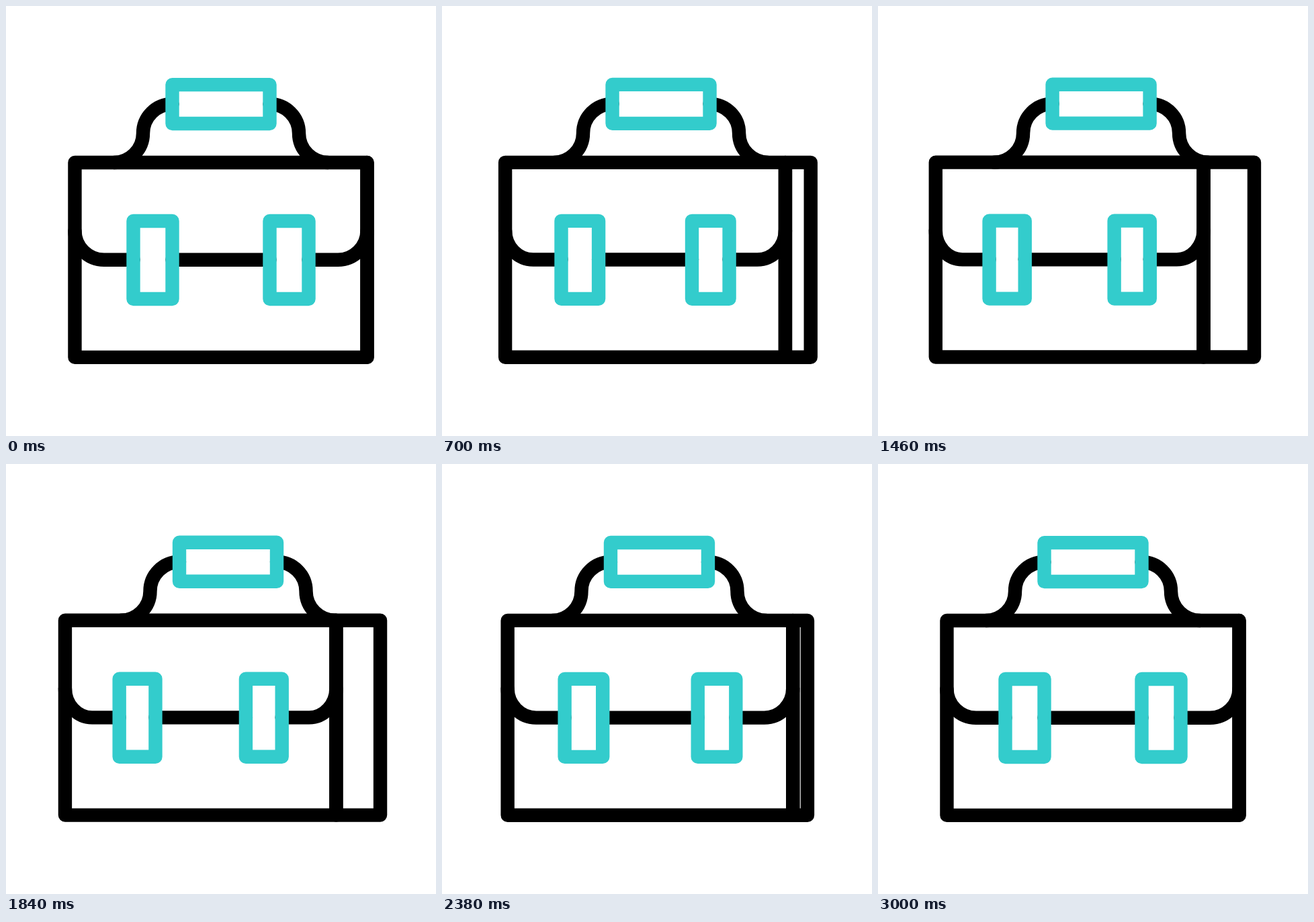
Animation, 640 px wide and 640 px high, one loop 3.6 s. Source, as an HTML page with a canvas:

```html
<!DOCTYPE html>
<html lang="en">
<head>
<meta charset="utf-8">
<title>Briefcase</title>
<style>
  html, body { margin: 0; width: 100%; height: 100%; overflow: hidden; background: #fff; }
  canvas { display: block; width: 640px; height: 640px; }
</style>
</head>
<body>
<canvas id="stage" width="640" height="640"></canvas>
<script>
const ctx = document.getElementById('stage').getContext('2d');
const LOOP = 3600, OPEN = 1400, CLOSED = 3000, STEP = 20;
const BLACK = '#000', TEAL = '#33cccc';
const LEFT = 102.45, RIGHT = 537.5, TOP = 233, BOTTOM = 522.9, R = 43.5;

// cubic-bezier(.5, 0, .5, 1)
function ease(u) {
  if (u <= 0) return 0;
  if (u >= 1) return 1;
  let lo = 0, hi = 1;
  for (let i = 0; i < 30; i++) {
    const s = (lo + hi) / 2;
    if (1.5 * s * (1 - s) + s * s * s < u) lo = s; else hi = s;
  }
  return lo * lo * (3 - 2 * lo);
}

function turn(t) {
  return t < OPEN ? ease(t / OPEN) : 1 - ease((t - OPEN) / (CLOSED - OPEN));
}

function stroke(color, path) {
  ctx.strokeStyle = color;
  ctx.beginPath();
  path();
  ctx.stroke();
}

function box(color, x1, y1, x2, y2) {
  stroke(color, () => ctx.rect(x1, y1, x2 - x1, y2 - y1));
}

function drawHandle(dx) {
  for (const side of [-1, 1]) {
    const x = 320 + dx + side * 72.5;
    const inner = side < 0;
    stroke(BLACK, () => {
      ctx.moveTo(x, 146);
      ctx.arc(x, 146 + R, R, -Math.PI / 2, inner ? -Math.PI : 0, inner);
      ctx.arc(x + side * 2 * R, 146 + R, R, inner ? 0 : Math.PI, Math.PI / 2, !inner);
    });
  }
  box(TEAL, 247.5 + dx, 117.1, 392.5 + dx, 175);
}

function drawFront(left, right) {
  const k = (right - left) / (RIGHT - LEFT);
  const at = x => left + (x - LEFT) * k;
  const flapY = 377.7, rx = R * k;

  box(BLACK, left, TOP, right, BOTTOM);
  stroke(BLACK, () => {
    ctx.moveTo(left, flapY - R);
    ctx.ellipse(left + rx, flapY - R, rx, R, 0, Math.PI, Math.PI / 2, true);
    ctx.lineTo(at(189.5), flapY);
    ctx.moveTo(at(247.5), flapY);
    ctx.lineTo(at(392.5), flapY);
    ctx.moveTo(at(450.5), flapY);
    ctx.lineTo(right - rx, flapY);
    ctx.ellipse(right - rx, flapY - R, rx, R, 0, Math.PI / 2, 0, true);
  });
  box(TEAL, at(189.5), 320, at(247.5), 436);
  box(TEAL, at(392.5), 320, at(450.5), 436);
}

function draw(p) {
  ctx.setTransform(1, 0, 0, 1, 0, 0);
  ctx.fillStyle = '#fff';
  ctx.fillRect(0, 0, 640, 640);
  ctx.translate(0, -0.35 * p);
  ctx.lineWidth = 20.4;
  ctx.lineJoin = ctx.lineCap = 'round';

  const right = RIGHT - 53.1 * p;
  drawHandle(12.1 * p);
  box(BLACK, right, TOP, RIGHT + 22.5 * p, BOTTOM);
  drawFront(LEFT - 16.7 * p, right);
}

const start = performance.now();
function frame() {
  const t = (performance.now() - start) % LOOP;
  draw(turn(Math.floor(t / STEP) * STEP));
  requestAnimationFrame(frame);
}
frame();
</script>
</body>
</html>
```
